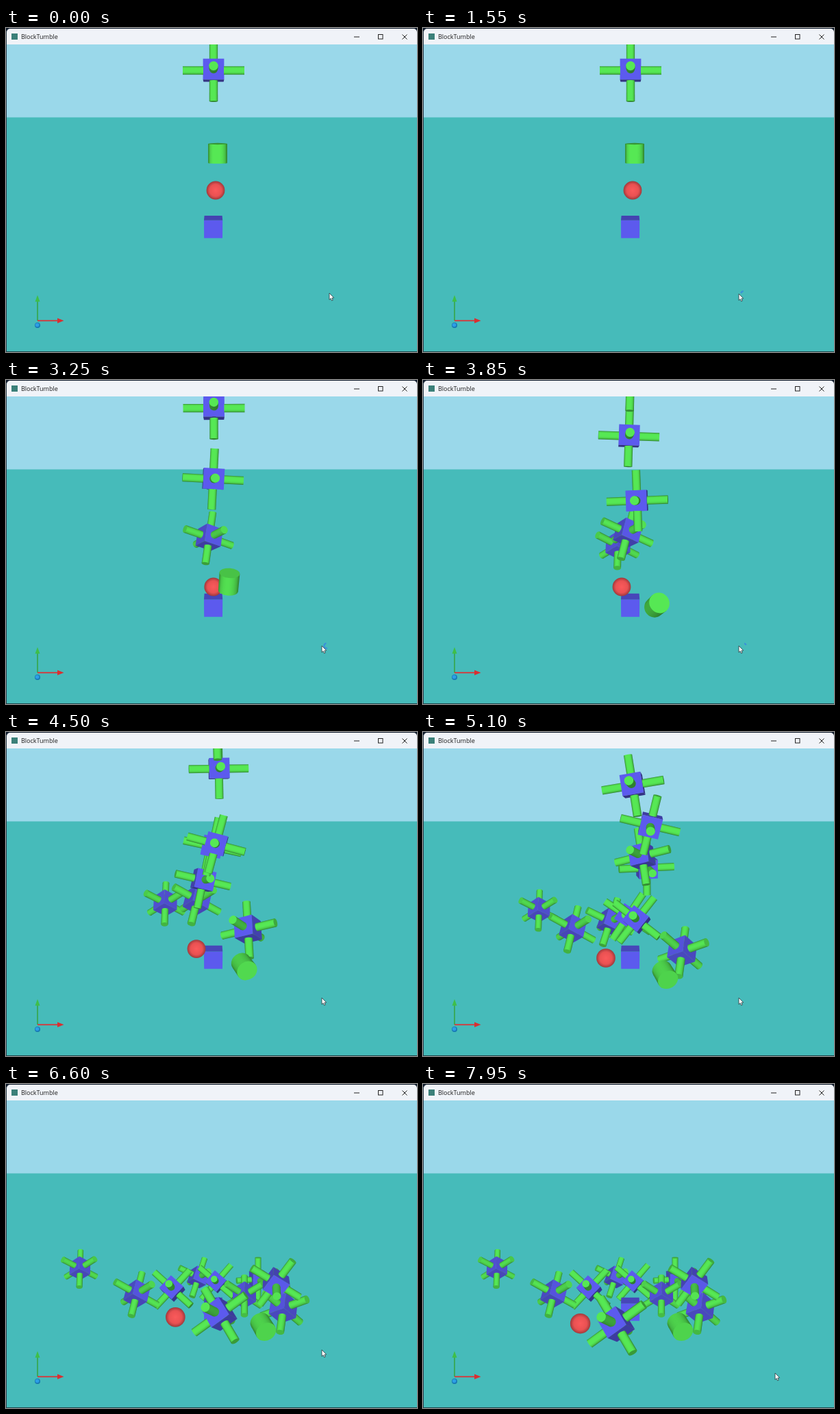
Recreate the animation shown at these times as an HTML page with a canvas. Size 600 by 473 pixels, loop 8000 ms.

```html
<!DOCTYPE html>
<html lang="en">
<head>
<meta charset="utf-8">
<title>BlockTumble</title>
<style>
  html, body { margin: 0; width: 100%; height: 100%; overflow: hidden; background: #46bbba; }
  canvas { display: block; }
  #title { position: absolute; left: 22px; top: 6px; font: 9px/13px "Open Sans", "Noto Sans", sans-serif; color: #1b1b1b; }
</style>
</head>
<body>
<canvas id="stage" width="600" height="473"></canvas>
<div id="title">BlockTumble</div>
<script>
const ctx = document.getElementById('stage').getContext('2d');
const LOOP = 8, FOCAL = 541, DROP = 1.78;
const COLUMN = { x: 303, y: 62, gap: 118, size: 45 };
const GREEN = [86, 232, 84], BLUE = [92, 90, 238];

// numbers and vectors
const clamp = (v, lo = 0, hi = 1) => Math.min(hi, Math.max(lo, v));
const lerp = (a, b, u) => a + (b - a) * u;
const smooth = (t, from, to) => { const u = clamp((t - from) / (to - from)); return u * u * (3 - 2 * u); };
const dot = (a, b) => a[0] * b[0] + a[1] * b[1] + a[2] * b[2];
const mul = (a, k) => a.map(v => v * k);
const add = (a, b) => a.map((v, i) => v + b[i]);
const mix = (a, b, u) => a.map((v, i) => lerp(v, b[i], u));
const norm = a => mul(a, 1 / (Math.hypot(...a) || 1));
const cross = (a, b) => [a[1] * b[2] - a[2] * b[1], a[2] * b[0] - a[0] * b[2], a[0] * b[1] - a[1] * b[0]];
const LIGHT = norm([-.1, -.12, 1]);

function shade(color, normal) {
  const k = Math.min(1, .54 + .52 * Math.max(0, dot(normal, LIGHT)));
  return `rgb(${color.map(c => Math.round(c * k))})`;
}

// Three axes as seen from the camera, which looks slightly down
const tiltAt = y => clamp((y - 137) / FOCAL, -.3, .5);
function upright(y) {
  const a = tiltAt(y);
  return [[0, Math.sin(a), Math.cos(a)], [1, 0, 0], [0, Math.cos(a), -Math.sin(a)]];
}

// One arm points at the viewer with a screen offset, another lies at a screen angle
function aimed(ax, ay, degrees, size) {
  const az = Math.sqrt(size * size - ax * ax - ay * ay);
  const c = Math.cos(degrees * Math.PI / 180), s = Math.sin(degrees * Math.PI / 180);
  const a = norm([ax, ay, az]), b = norm([c, s, -(ax * c + ay * s) / az]);
  return [a, b, cross(a, b)];
}

// A jack looks the same along any axis, so rename axes for the shortest turn
function align(from, to) {
  const orders = [0, 1, 2].flatMap(i => [1, 2].map(k => [i, (i + k) % 3, (i + 3 - k) % 3]));
  const score = o => o.reduce((sum, j, i) => sum + Math.abs(dot(from[i], to[j])), 0);
  const best = orders.reduce((p, q) => score(q) > score(p) ? q : p);
  return best.map((j, i) => mul(to[j], dot(from[i], to[j]) < 0 ? -1 : 1));
}

function blend(from, to, u) {
  const a = norm(mix(from[0], to[0], u)), b0 = mix(from[1], to[1], u);
  const b = norm(add(b0, mul(a, -dot(a, b0))));
  return [a, b, cross(a, b)];
}

// drawing
function project(x, y, p) {
  const k = FOCAL / (FOCAL - p[2]);
  return [x + p[0] * k, y + p[1] * k, k];
}

function poly(points, fill) {
  ctx.beginPath();
  points.forEach(p => ctx.lineTo(p[0], p[1]));
  ctx.closePath();
  ctx.fillStyle = fill;
  ctx.fill();
}

function line(points, color, width) {
  ctx.beginPath();
  points.forEach(([x, y]) => ctx.lineTo(x, y));
  ctx.strokeStyle = color;
  ctx.lineWidth = width;
  ctx.stroke();
}

function oval(x, y, rx, ry, angle, fill) {
  ctx.beginPath();
  ctx.ellipse(x, y, rx, ry, angle, 0, 7);
  ctx.fillStyle = fill;
  ctx.fill();
}

function rod(x, y, dir, from, to, r, color) {
  if (dir[2] < 0) { dir = mul(dir, -1); [from, to] = [-to, -from]; }
  const flat = Math.hypot(dir[0], dir[1]) || 1e-6;
  const n = [-dir[1] / flat, dir[0] / flat, 0], angle = Math.atan2(n[1], n[0]);
  const facing = norm(add([0, 0, 1], mul(dir, -dir[2])));
  const far = project(x, y, mul(dir, from)), near = project(x, y, mul(dir, to));
  const rf = r * far[2], rn = r * near[2];
  const mx = (far[0] + near[0]) / 2, my = (far[1] + near[1]) / 2;
  const g = ctx.createLinearGradient(mx - n[0] * rn, my - n[1] * rn, mx + n[0] * rn, my + n[1] * rn);
  for (let q = -1; q <= 1; q += .25)
    g.addColorStop((q + 1) / 2, shade(color, add(mul(n, q), mul(facing, Math.sqrt(1 - q * q)))));
  const side = (p, k) => [p[0] + n[0] * k, p[1] + n[1] * k];
  oval(far[0], far[1], rf, rf * dir[2], angle, g);
  poly([side(far, -rf), side(near, -rn), side(near, rn), side(far, rf)], g);
  oval(near[0], near[1], rn, rn * dir[2], angle, shade(color, dir));
}

function box(x, y, axes, h) {
  axes.forEach((axis, i) => [1, -1].forEach(sign => {
    const n = mul(axis, sign);
    if (n[2] * FOCAL <= h) return;
    const u = axes[(i + 1) % 3], v = axes[(i + 2) % 3];
    const corners = [[1, 1], [1, -1], [-1, -1], [-1, 1]].map(([p, q]) =>
      project(x, y, mul(add(n, add(mul(u, p), mul(v, q))), h)));
    poly(corners, shade(BLUE, n));
  }));
}

function jackBody(x, y, s, axes) {
  const arms = axes.flatMap(a => [a, mul(a, -1)]).sort((a, b) => a[2] - b[2]);
  const h = s * .333, arm = d => rod(x, y, d, h, s, s * .137, GREEN);
  arms.filter(d => d[2] < 0).forEach(arm);
  box(x, y, axes, h);
  arms.filter(d => d[2] >= 0).forEach(arm);
}

function ballBody(x, y, r) {
  const g = ctx.createRadialGradient(x, y, 0, x, y, r);
  g.addColorStop(0, '#fa5a5b');
  g.addColorStop(.65, '#e95152');
  g.addColorStop(1, '#9f3a3c');
  oval(x, y, r, r, 0, g);
}

// Each jack falls from its place in the column, lands, then slides to rest
const jacks = [];
function jack(land, rest, aim) {
  const startY = COLUMN.y - COLUMN.gap * jacks.length;
  const pose = align(upright(137), aimed(...aim, rest.size));
  jacks.push(t => {
    const fall = smooth(t, DROP, land.t), knock = fall ** 6, slide = smooth(t, land.t, rest.t);
    const x = lerp(lerp(COLUMN.x, land.x, knock), rest.x, slide);
    const y = lerp(lerp(startY, land.y, fall), rest.y, slide);
    const size = lerp(COLUMN.size, rest.size, (knock + slide) / 2);
    return { depth: size, draw: () => jackBody(x, y, size, blend(upright(y), pose, knock)) };
  });
}
jack({ t: 3.5, x: 294, y: 240 }, { t: 6.1, x: 108, y: 269, size: 32 }, [21, -13, 92]);
jack({ t: 4.1, x: 298, y: 232 }, { t: 5.6, x: 191, y: 306, size: 38 }, [21, -13, 104]);
jack({ t: 5, x: 378, y: 320 }, { t: 6.6, x: 405, y: 327, size: 42 }, [33, -12, 98]);
jack({ t: 5.2, x: 273, y: 278 }, { t: 6.6, x: 281, y: 282, size: 32 }, [14, -8, 108]);
jack({ t: 5.5, x: 298, y: 292 }, { t: 6.6, x: 307, y: 289, size: 33 }, [-3, -4, -49]);
jack({ t: 5.4, x: 313, y: 290 }, { t: 6.2, x: 243, y: 299, size: 37 }, [-5, -7, 133]);
jack({ t: 5.7, x: 338, y: 255 }, { t: 6.6, x: 368, y: 285, size: 32 }, [9, 7, 90]);
jack({ t: 6, x: 338, y: 306 }, { t: 6.6, x: 348, y: 308, size: 36 }, [-25, -16, 90]);
jack({ t: 6.1, x: 372, y: 296 }, { t: 6.7, x: 396, y: 290, size: 42 }, [1, 18, -53]);
jack({ t: 6.4, x: 314, y: 335 }, { t: 7.6, x: 282, y: 351, size: 50 }, [-20, -10, -36]);

// Straight runs through a few points [t, x, y]
function along(points, t) {
  const i = Math.max(1, points.findIndex(p => p[0] > t));
  const [a, b] = t >= points.at(-1)[0] ? points.slice(-2) : [points[i - 1], points[i]];
  return mix(a, b, clamp((t - a[0]) / (b[0] - a[0]))).slice(1);
}

function ball(t) {
  const [x, y] = along([[DROP, 306, 237], [2.55, 306, 302], [3.1, 306, 302], [3.85, 290, 302], [5.1, 267, 330], [LOOP, 229, 350]], t);
  const r = 13.4 + Math.max(0, y - 320) / 22;
  return { depth: r * 3.4, draw: () => ballBody(x, y, r) };
}

function cube(t) {
  const y = lerp(290, 328.5, smooth(t, DROP, 2.5));
  return { depth: 44, draw: () => box(COLUMN.x - .4, y, upright(y), 13.2) };
}

function drum(t) {
  const [x, y] = along([[DROP, 309, 183], [2.6, 308.5, 258], [3.85, 341, 329], [5.1, 353, 354], [5.9, 357, 354], [6.6, 375, 354]], t);
  const tip = norm(mix([0, -1, tiltAt(y)], [.3, .5, .8], smooth(t, 2.6, 4.9)));
  const r = lerp(14, 15, smooth(t, DROP, 4));
  return { depth: 48, draw: () => rod(x, y, tip, -r, r, r, GREEN) };
}

function triad() {
  line([[46, 427], [46, 399]], '#35a646', 1.6);
  poly([[46, 390], [49.5, 399.5], [42.5, 399.5]], '#3fbf48');
  line([[46, 427.3], [76, 427.3]], '#dd3236', 1.8);
  poly([[84.5, 427.3], [75, 423.5], [75, 431]], '#d92f31');
  oval(46, 434, 4, 4, 0, '#1878b4');
  oval(45.6, 433.5, 2.8, 2.8, 0, '#2c9fe6');
}

function chrome() {
  ctx.fillStyle = '#101c2c';
  ctx.fillRect(0, 0, 600, 24);
  ctx.fillStyle = '#f0f3f8';
  ctx.beginPath();
  ctx.roundRect(1, 1, 599, 23, [5, 5, 0, 0]);
  ctx.fill();
  ctx.fillStyle = '#2b3c4a';
  ctx.fillRect(0, 4, 1, 469);
  ctx.fillStyle = '#20474c';
  ctx.fillRect(0, 472, 600, 1);
  ctx.fillStyle = '#3b8079';
  ctx.fillRect(8, 8, 9, 9);
  line([[508, 13], [516, 13]], '#222', 1);
  ctx.strokeRect(543.5, 9.5, 6.5, 6.5);
  line([[578.5, 9.5], [585.5, 16.5]], '#222', 1);
  line([[585.5, 9.5], [578.5, 16.5]], '#222', 1);
}

function pointer(t) {
  const [x, y] = along([[.05, 472, 387], [.3, 461, 388], [6.85, 461, 388], [7.7, 514, 422]], t);
  if (t >= .95 && t < 4.1) {
    const start = t * 6.2, length = 3.4 + 2.4 * Math.cos((t - 2.6) * 2.5);
    ctx.lineWidth = 2;
    ctx.strokeStyle = '#3a8edb';
    ctx.beginPath();
    ctx.arc(x + 7, y, 3.7, start, start + length);
    ctx.stroke();
  }
  const arrow = [[0, 0], [0, 9.6], [2.1, 7.7], [3.5, 11], [5.2, 10.3], [3.8, 7.1], [6.7, 6.9]].map(([a, b]) => [x + a, y + b]);
  poly(arrow, '#fff');
  line([...arrow, arrow[0]], '#26363c', .8);
}

function render(t) {
  ctx.fillStyle = '#9ad8ea';
  ctx.fillRect(0, 0, 600, 131);
  ctx.fillStyle = '#46bbba';
  ctx.fillRect(0, 130.5, 600, 343);
  [...jacks, cube, drum, ball].map(body => body(t)).sort((a, b) => a.depth - b.depth).forEach(b => b.draw());
  triad();
  chrome();
  pointer(t);
}

const began = performance.now();
function tick() {
  render((performance.now() - began) / 1000 % LOOP);
  requestAnimationFrame(tick);
}
tick();
</script>
</body>
</html>
```
